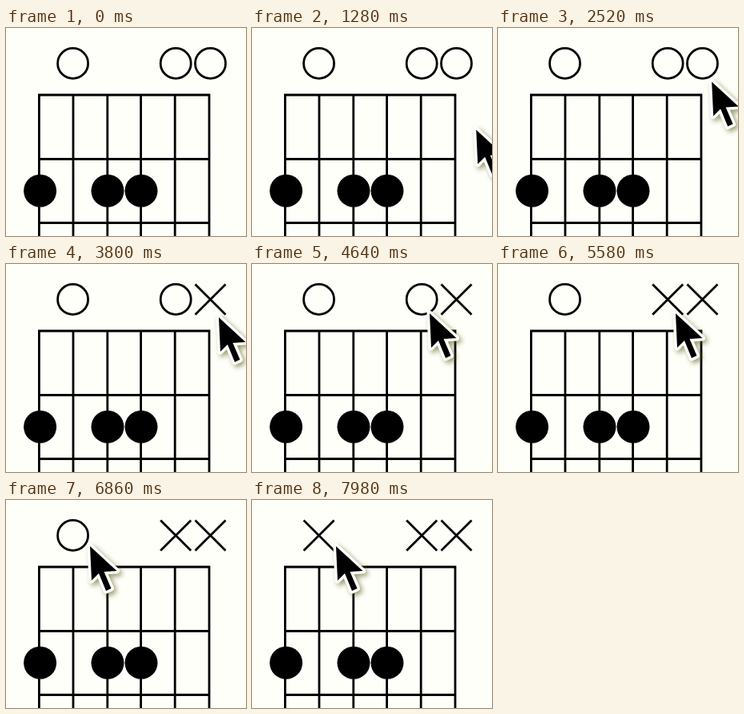
An HTML page that plays this animation: 300 by 261 pixels, repeating every 8000 ms.

```html
<!DOCTYPE html>
<html lang="en">
<head>
<meta charset="utf-8">
<title>Guitar chord diagram</title>
<style>
  html, body { margin: 0; width: 100%; height: 100%; overflow: hidden; background: #fffffa; }
  svg { display: block; width: 300px; height: 261px; }
  .ink { fill: none; stroke: #000; stroke-width: 2.8; }
  #cursor { filter: drop-shadow(3px 3px 3px rgba(90, 90, 20, .6)); }
</style>
</head>
<body>
<svg viewBox="0 0 300 261">
  <path class="ink" d="M40 84H255.4M40 164.5H255.4M40 244.5H255.4
    M41.4 84V261M84 84V261M126.8 84V261M168.6 84V261M211.2 84V261M254 84V261"/>
  <g>
    <circle cx="42.6" cy="204.3" r="20.5"/>
    <circle cx="127" cy="204.3" r="20.5"/>
    <circle cx="169" cy="204.3" r="20.5"/>
  </g>
  <g id="marks" class="ink"></g>
  <g id="cursor">
    <path d="M0 0L2 43L11 34L20 56L26.5 53L17.5 32L33.5 31Z"
      stroke="#fff" stroke-width="7" stroke-linejoin="round" paint-order="stroke"/>
  </g>
</svg>
<script>
const LOOP = 8000;

// Open strings: [centre x, time at which it is muted]
const strings = [[83.6, 7340], [212.2, 5140], [255.5, 3350]];

// Pointer tip: [time, x, y]
const path = [
  [0, 312, 182], [600, 312, 182], [700, 302, 171], [1420, 279, 122],
  [1520, 279, 120], [1840, 279, 84], [2260, 271, 70], [2700, 266, 67],
  [3790, 266, 67], [4600, 222, 62], [5700, 222, 62], [6320, 114, 62],
  [6460, 108, 61], [6860, 105, 58], [LOOP, 105, 58]
];

const NS = 'http://www.w3.org/2000/svg';
const cursor = document.getElementById('cursor');
const marks = strings.map(([x, muteAt]) => {
  const add = d => {
    const shape = document.createElementNS(NS, 'path');
    shape.setAttribute('d', d);
    return document.getElementById('marks').appendChild(shape);
  };
  return {
    muteAt,
    open: add(`M${x - 19} 44.4a19 19 0 1 1 38 0a19 19 0 1 1 -38 0Z`),
    muted: add(`M${x - 19} 25.4l38 38m0 -38l-38 38`)
  };
});

const slope = (i, k) => {
  const a = path[i], b = path[i + 1];
  return a && b ? (b[k] - a[k]) / (b[0] - a[0]) : 0;
};

// Smooth tangent that never overshoots the keys
const tangent = (i, k) => {
  const p = slope(i - 1, k), q = slope(i, k);
  return p * q > 0 ? 2 * p * q / (p + q) : 0;
};

function along(t, k) {
  let i = 0;
  while (i < path.length - 2 && t >= path[i + 1][0]) i++;
  const a = path[i], b = path[i + 1], d = b[0] - a[0], u = (t - a[0]) / d;
  const s = u * u * (3 - 2 * u);
  return a[k] + (b[k] - a[k]) * s
    + d * u * (1 - u) * (tangent(i, k) * (1 - u) - tangent(i + 1, k) * u);
}

function draw(now) {
  const t = now % LOOP;
  for (const m of marks) {
    const muted = t >= m.muteAt;
    m.open.style.display = muted ? 'none' : '';
    m.muted.style.display = muted ? '' : 'none';
  }
  cursor.setAttribute('transform', `translate(${along(t, 1)} ${along(t, 2)})`);
}

const start = performance.now();
function frame() {
  draw(performance.now() - start);
  requestAnimationFrame(frame);
}
frame();
</script>
</body>
</html>
```
